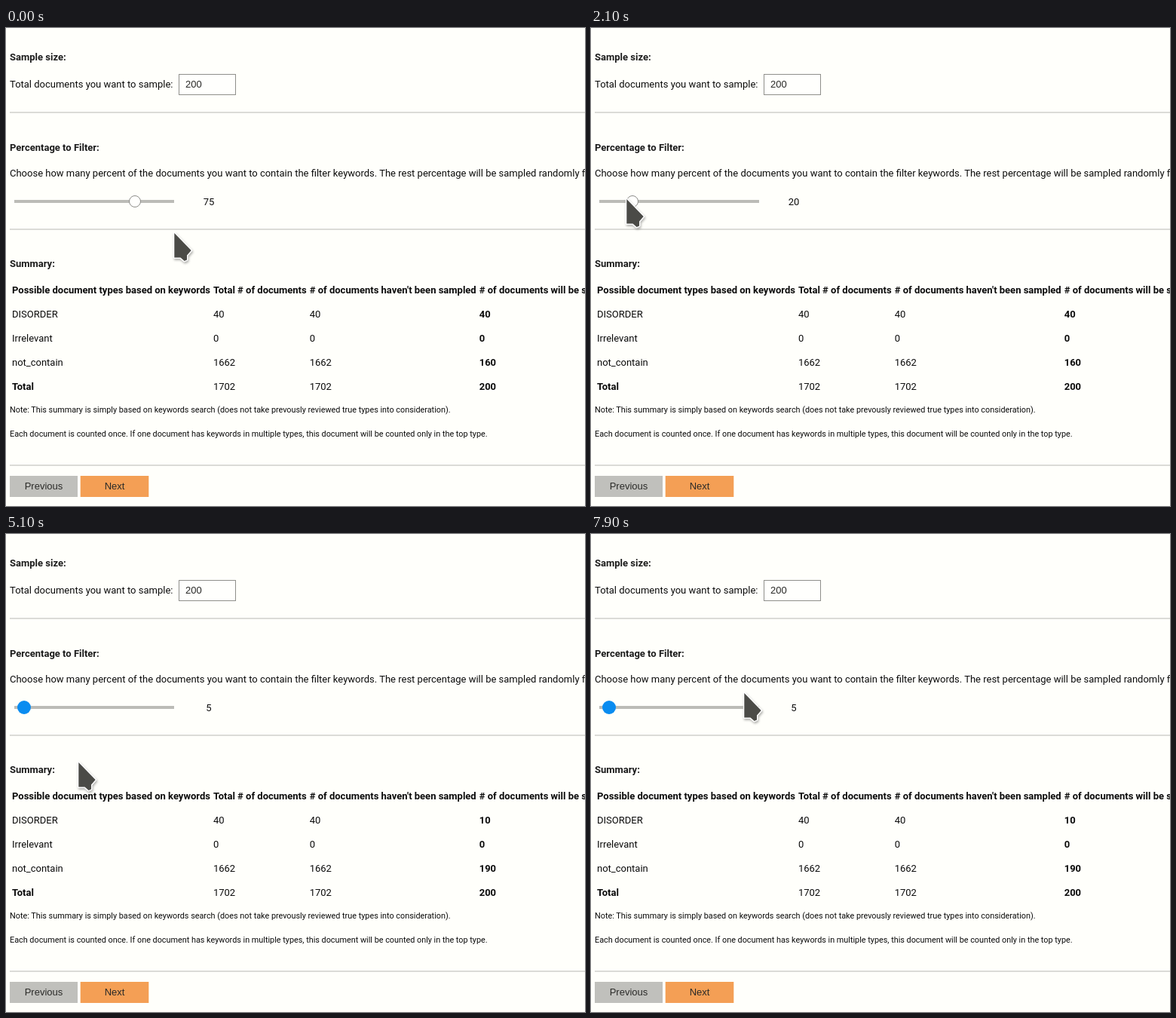
Recreate the animation shown at these times as an HTML page. Size 768 by 634 pixels, loop 8000 ms.

```html
<!DOCTYPE html>
<html lang="en">
<head>
<meta charset="utf-8">
<title>Sampling settings</title>
<style>
  html, body { margin: 0; width: 100%; height: 100%; overflow: hidden; background: #fffffb; }
  body { position: relative; font: 13px/15px Roboto, sans-serif; color: #0c0c0c; }
  svg, p, table { position: absolute; left: 0; top: 0; margin: 0; white-space: nowrap; }
  p { left: 5px; }
  .head { font-weight: 700; color: #1c1c1c; }
  .note { font-size: 10.833px; }
  .ui { font-family: "Liberation Sans", sans-serif; color: #2a2a28; }
  .mid { width: 90px; text-align: center; }
  table { left: 5px; top: 331px; border-spacing: 2px; line-height: 29px; }
  th, td { padding: 0 1px 1px; }
  td:last-child, tr:last-child td:first-child { font-weight: 700; }
  #cursor { filter: drop-shadow(1px 2px 1.5px rgba(0, 0, 0, .3)); }
</style>
</head>
<body>
<svg width="768" height="634">
  <path d="M5 112H768M5 267H768M5 580H768" stroke="#dbdbd7" stroke-width="2"/>
  <rect x="229.5" y="61.5" width="75" height="27" fill="#fffffd" stroke="#8f8f8b"/>
  <rect x="11" y="228" width="212" height="4" fill="#bcbcb7"/>
  <circle id="thumb" cy="230"/>
  <rect x="5" y="594" width="90" height="28" fill="#c0c0bc"/>
  <rect x="98.7" y="594" width="90.6" height="28" fill="#f49f55"/>
</svg>

<p class="head" style="top:31px">Sample size:</p>
<p style="top:67px">Total documents you want to sample:</p>
<p class="ui" style="top:67px; left:238px">200</p>

<p class="head" style="top:151px">Percentage to Filter:</p>
<p style="top:185px">Choose how many percent of the documents you want to contain the filter keywords. The rest percentage will be sampled randomly from the others.</p>
<p class="mid" id="percent" style="top:223px; left:224px"></p>

<p class="head" style="top:305px">Summary:</p>
<table>
  <tr><th>Possible document types based on keywords<th>Total # of documents<th># of documents haven't been sampled<th># of documents will be sampled
  <tr><td>DISORDER<td>40<td>40<td id="hits">
  <tr><td>Irrelevant<td>0<td>0<td>0
  <tr><td>not_contain<td>1662<td>1662<td id="others">
  <tr><td>Total<td>1702<td>1702<td>200
</table>
<p class="note" style="top:499px">Note: This summary is simply based on keywords search (does not take prevously reviewed true types into consideration).</p>
<p class="note" style="top:531px">Each document is counted once. If one document has keywords in multiple types, this document will be counted only in the top type.</p>

<p class="ui mid" style="top:600px">Previous</p>
<p class="ui mid" style="top:600px; left:99px">Next</p>

<svg width="768" height="634">
  <path id="cursor" d="M1.3 2V34.5H9.5L14.7 39L18 37.5V31.5L23.7 25Z"
        fill="#4b4b47" stroke="#fff" stroke-width="3" stroke-linejoin="round" paint-order="stroke"/>
</svg>
<script>
const LOOP = 8000, STEP = 100, TOTAL = 200, KEYWORD_DOCS = 40;
const $ = id => document.getElementById(id);

// Pointer glides: start, end, x, y, acceleration power
const home = { x: 222, y: 270 };
const glides = [
  [0, 400, 162, 223],
  [700, 1500, 46, 225, 2],
  [2600, 2900, 25, 223],
  [3500, 4300, 17, 224],
  [4300, 4400, 15, 224],
  [4900, 5100, 95, 301],
  [5200, 5500, 112, 300],
  [5600, 5700, 52, 254],
  [5700, 6000, 21, 235],
  [6100, 6500, 14, 230],
  [7600, 7700, 45, 244],
  [7700, 7900, 202, 209]
];

// Slider grabs: press, drop, end of highlight
const grabs = [
  { down: 700, drop: 2100, up: 2100 },
  { down: 2700, drop: 3500, up: 3500 },
  { down: 4400, drop: 4900, up: 6500 },
  { down: 6900, drop: 6900, up: LOOP }
];

function pointer(t) {
  let { x, y } = home;
  for (const [start, end, toX, toY, power = 1] of glides) {
    const p = Math.min(1, Math.max(0, (t - start) / (end - start))) ** power;
    x += (toX - x) * p;
    y += (toY - y) * p;
  }
  return { x, y };
}

// The slider runs one step ahead of the drawn pointer and snaps to fives
function percentOf(grab, t) {
  if (!grab) return 75;
  const { x } = pointer(Math.min(t + STEP, grab.drop));
  return 5 * Math.round((x - 4.5) / 2.1 / 5);
}

function draw(t) {
  const { x, y } = pointer(t);
  $("cursor").setAttribute("transform", `translate(${x} ${y})`);

  const grab = grabs.findLast(g => g.down <= t);
  const percent = percentOf(grab, t);
  const active = grab && t < grab.up;
  const thumb = $("thumb");
  thumb.setAttribute("cx", Math.round(13.2 + 2.1 * percent));
  thumb.setAttribute("r", active ? 9 : 7.5);
  thumb.setAttribute("fill", active ? "#0a8cf0" : "#fffffd");
  thumb.setAttribute("stroke", active ? "none" : "#8c8c88");
  $("percent").textContent = percent;

  const applied = percentOf(grabs.findLast(g => g.drop <= t), t);
  const hits = Math.min(KEYWORD_DOCS, TOTAL * applied / 100);
  $("hits").textContent = hits;
  $("others").textContent = TOTAL - hits;
}

function tick() {
  const t = performance.now() % LOOP;
  draw(t - t % STEP);
  requestAnimationFrame(tick);
}
tick();
</script>
</body>
</html>
```
